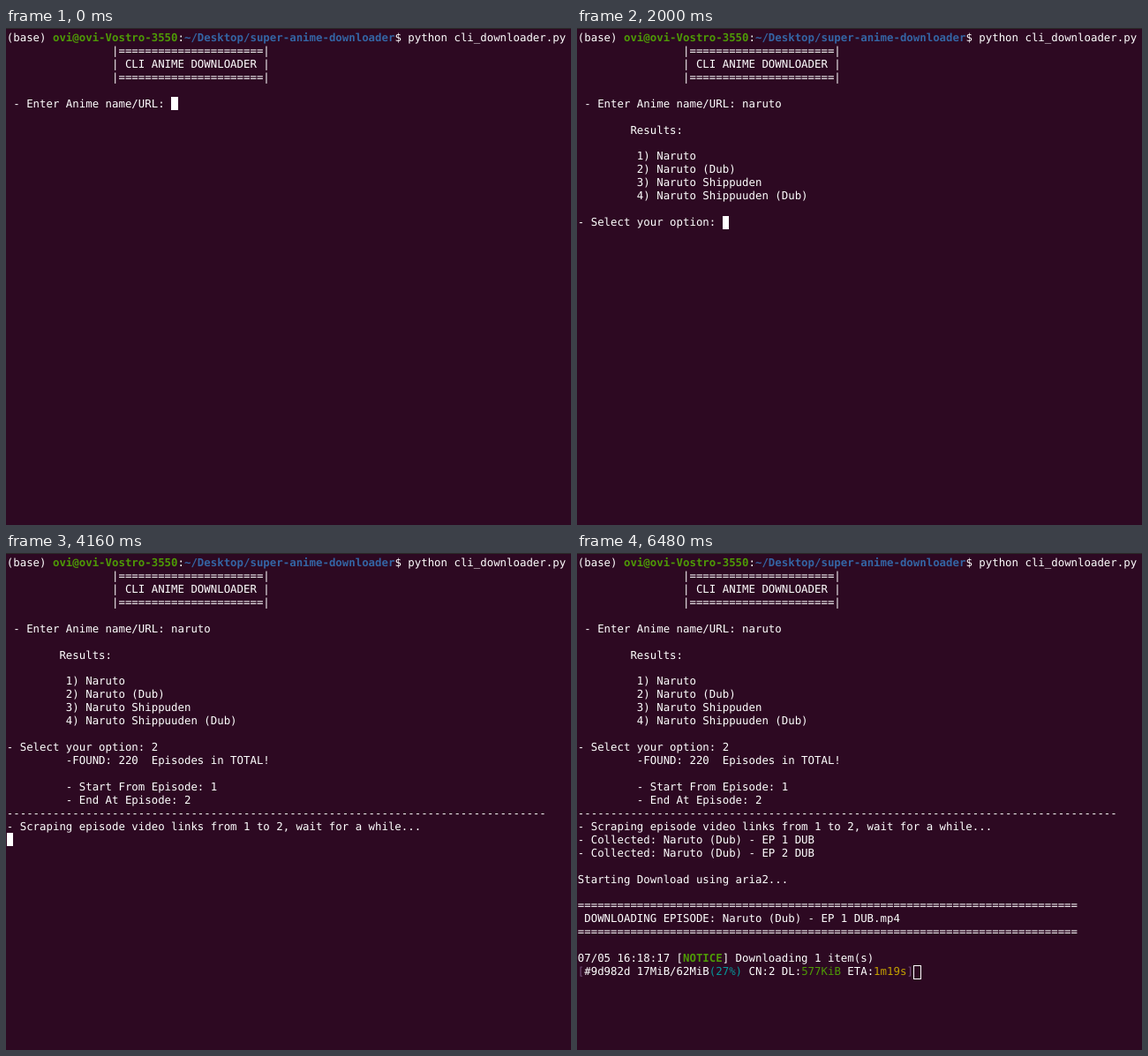
These frames come from a looping animation (640x563 px, 6.56 s). An HTML page:

```html
<!DOCTYPE html>
<html lang="en">
<head>
<meta charset="utf-8">
<title>CLI downloader</title>
<style>
  html, body { margin: 0; width: 100%; height: 100%; overflow: hidden; background: #2d0922; }
  #term {
    position: absolute; inset: 0; overflow: hidden; color: #fff;
    box-shadow: inset 0 1px #2b2a29;
    font: 12.383px/14.94px "DejaVu Sans Mono", monospace;
    text-rendering: geometricPrecision; font-kerning: none; font-variant-ligatures: none;
  }
  .row { position: absolute; left: .8px; white-space: pre; }
  #cursor { position: absolute; width: 7.5px; height: 15px; box-sizing: border-box; background: #fff; }
  #cursor.hollow { background: none; border: 1px solid #fff; width: 9px; height: 16px; }
  .g { color: #4e9a06; }
  .b { color: #3465a4; }
  .c { color: #06989a; }
  .y { color: #c4a000; }
  .m { color: #75507b; }
</style>
</head>
<body>
<div id="term"><div id="cursor"></div></div>
<script>
const LOOP = 6560, CELL = 7.455, LINE = 14.94, LEFT = .8, TOP = 4;
const term = document.getElementById('term');
const cursor = document.getElementById('cursor');

const pad = n => ' '.repeat(n);
const tint = (c, s) => `<span class="${c}">${s}</span>`;
const bold = (c, s) => `<b class="${c}">${s}</b>`;
const progress = (done, pct, speed, eta) =>
  tint('m', '[') + `#9d982d ${done}MiB/62MiB` + tint('c', `(${pct}%)`) +
  ' CN:2 DL:' + tint('g', speed + 'KiB') + ' ETA:' + tint('y', eta) + tint('m', ']');

const rule = pad(16) + '|' + '='.repeat(22) + '|';
const ask = ' - Enter Anime name/URL: ';
const pick = '- Select your option: ';
const first = pad(9) + '- Start From Episode: ';
const last = pad(9) + '- End At Episode: ';
const word = 'naruto';
const keys = [160, 240, 400, 480, 640, 720];

// [time, row, content]
const lines = [
  [0, 0, '(base) ' + bold('g', 'ovi@ovi-Vostro-3550') + ':' +
    bold('b', '~/Desktop/super-anime-downloader') + '$ python cli_downloader.py'],
  [0, 1, rule],
  [0, 2, pad(16) + '| CLI ANIME DOWNLOADER |'],
  [0, 3, rule],
  [0, 5, ask],
  ...keys.map((t, i) => [t, 5, ask + word.slice(0, i + 1)]),
  [1120, 7, pad(8) + 'Results:'],
  ...['Naruto', 'Naruto (Dub)', 'Naruto Shippuden', 'Naruto Shippuuden (Dub)']
    .map((s, i) => [1520, 9 + i, pad(9) + `${i + 1}) ${s}`]),
  [1520, 14, pick],
  [2160, 14, pick + '2'],
  [2800, 15, pad(9) + '-FOUND: 220  Episodes in TOTAL!'],
  [2800, 17, first],
  [3360, 17, first + '1'],
  [3680, 18, last],
  [4000, 18, last + '2'],
  [4160, 19, '-'.repeat(82)],
  [4160, 20, '- Scraping episode video links from 1 to 2, wait for a while...'],
  [4880, 21, '- Collected: Naruto (Dub) - EP 1 DUB'],
  [4880, 22, '- Collected: Naruto (Dub) - EP 2 DUB'],
  [4880, 24, 'Starting Download using aria2...'],
  [5600, 26, '='.repeat(76)],
  [5600, 27, ' DOWNLOADING EPISODE: Naruto (Dub) - EP 1 DUB.mp4'],
  [5600, 28, '='.repeat(76)],
  [5600, 30, '07/05 16:18:17 [' + bold('g', 'NOTICE') + '] Downloading 1 item(s)'],
  [5600, 31, progress(16, 26, 571, '1m21s')],
  [6320, 31, progress(17, 27, 577, '1m19s')]
];

// [time, row, column, hollow]; no row means hidden
const carets = [
  [0, 5, 25],
  ...keys.map((t, i) => [t, 5, 26 + i]),
  [880, 6, 0], [1120, 9, 0], [1520, 14, 22], [2160, 15, 0], [2640],
  [2800, 17, 31], [3200], [3360, 17, 32], [3680, 18, 27], [4000, 18, 28],
  [4160, 21, 0], [4640], [4880, 26, 0], [5120], [5600, 31, 51, true]
];

const rows = Array.from({ length: 32 }, (_, i) => {
  const el = document.createElement('div');
  el.className = 'row';
  el.style.top = TOP + i * LINE + 'px';
  term.append(el);
  return { el, html: '' };
});

function draw(t) {
  const now = rows.map(() => '');
  for (const [at, r, html] of lines) if (at <= t) now[r] = html;
  rows.forEach((row, i) => {
    if (row.html !== now[i]) row.el.innerHTML = row.html = now[i];
  });

  const [, r, col, hollow] = carets.filter(c => c[0] <= t).pop();
  cursor.hidden = r === undefined;
  if (cursor.hidden) return;
  cursor.className = hollow ? 'hollow' : '';
  cursor.style.left = LEFT + col * CELL + 'px';
  cursor.style.top = TOP + r * LINE - (hollow ? 0 : .5) + 'px';
}

const start = performance.now();
function tick() {
  draw((performance.now() - start) % LOOP);
  requestAnimationFrame(tick);
}
draw(0);
requestAnimationFrame(tick);
</script>
</body>
</html>
```
